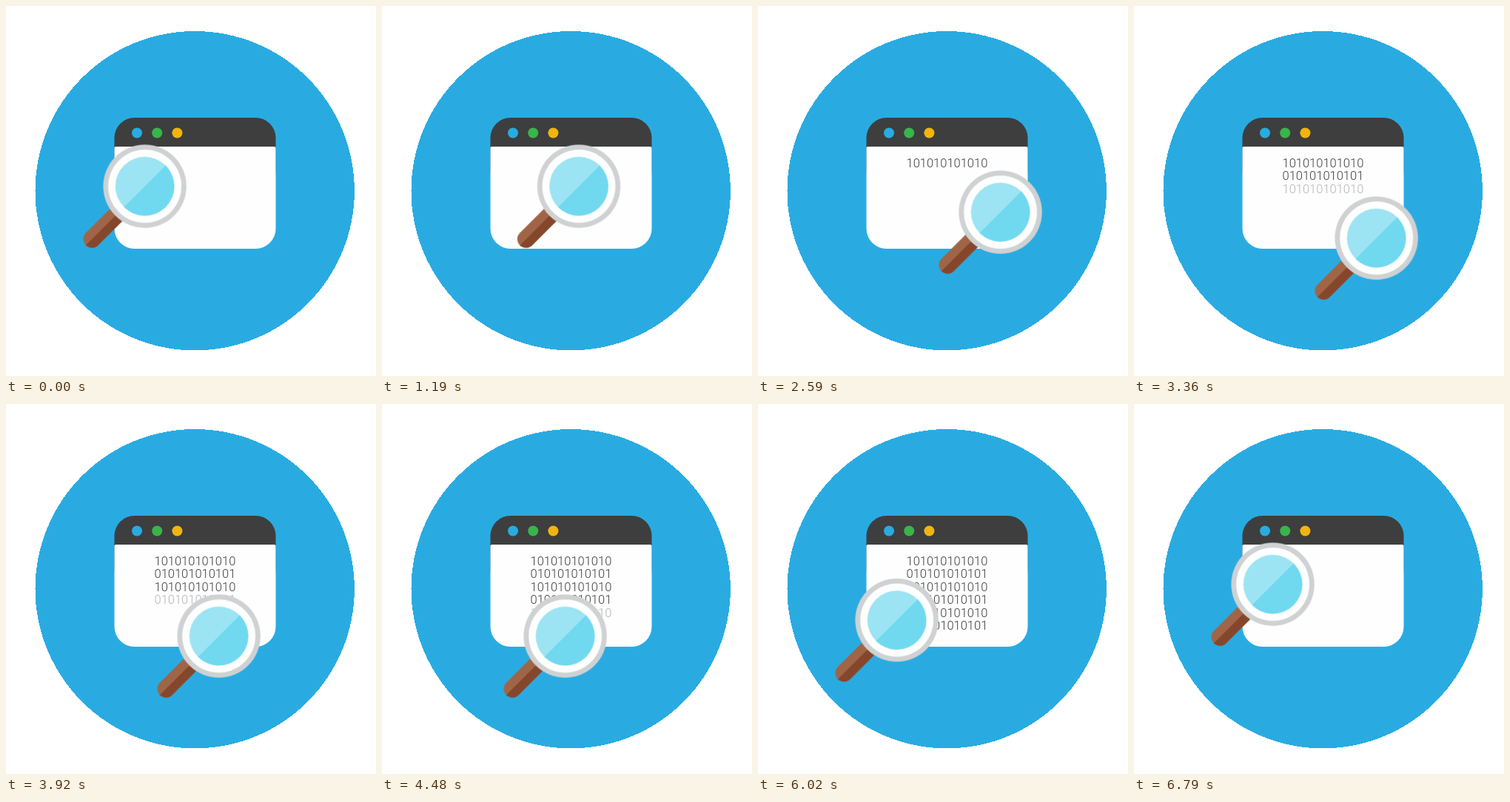
Recreate the animation shown at these times as an HTML page. Size 500 by 500 pixels, loop 6860 ms.

```html
<!DOCTYPE html>
<html lang="en">
<head>
<meta charset="utf-8">
<title>Code search</title>
<style>
  html, body { margin: 0; height: 100%; overflow: hidden; background: #fff; }
  svg { display: block; width: 100vw; height: 100vh; }

  /* 98 ticks of 70 ms; the tiny lead keeps each tick clear of rounding */
  .lens, .code { animation: 6860ms infinite -3ms; }
  .lens { animation-name: scan; }
  .code { animation-name: clear; }
  .code text {
    font: 300 16.5px Roboto, "Open Sans", sans-serif;
    fill: #3e3e3e;
    animation: reveal 6860ms calc(2027ms + var(--row) * 560ms) infinite backwards;
  }

  @keyframes scan {
    0%       { transform: translate(187.6px, 243.6px); }
    3.0612%  { transform: translate(187.6px, 243.6px); animation-timing-function: steps(25); }
    28.5714% { transform: translate(327.6px, 243.6px); }
    30.6122% { transform: translate(327.6px, 243.6px); animation-timing-function: steps(14); }
    44.8980% { transform: translate(327.6px, 313.6px); }
    48.9796% { transform: translate(327.6px, 313.6px); animation-timing-function: steps(28); }
    77.5510% { transform: translate(187.6px, 313.6px); }
    83.6735% { transform: translate(187.6px, 313.6px); animation-timing-function: steps(13); }
    96.9388%, 100% { transform: translate(187.6px, 243.6px); }
  }
  @keyframes reveal {
    0% { opacity: 0; animation-timing-function: steps(8); }
    8.1633%, 100% { opacity: 1; }
  }
  @keyframes clear {
    0% { opacity: 0; animation-timing-function: step-end; }
    29.5918% { opacity: 1; animation-timing-function: step-end; }
    93.8776% { opacity: 1; animation-timing-function: steps(3); }
    96.9388%, 100% { opacity: 0; }
  }
</style>
</head>
<body>
<svg viewBox="0 0 500 500">
  <circle cx="255.2" cy="249.7" r="215.7" fill="#29abe2" shape-rendering="crispEdges"/>

  <rect x="146.5" y="151" width="218" height="100" rx="27" fill="#3e3e3e"/>
  <path d="M148.5 190H362.5a2 2 0 0 1 2 2V301a27 27 0 0 1-27 27H173.5a27 27 0 0 1-27-27V192a2 2 0 0 1 2-2Z" fill="#fefefe"/>
  <circle cx="177" cy="171.5" r="7" fill="#29abe2"/>
  <circle cx="204.2" cy="171.5" r="7" fill="#39b54a"/>
  <circle cx="231.4" cy="171.5" r="7" fill="#f2b50c"/>

  <g class="code">
    <text style="--row:0" x="200.5" y="218">101010101010</text>
    <text style="--row:1" x="200.5" y="235.4">010101010101</text>
    <text style="--row:2" x="200.5" y="252.8">101010101010</text>
    <text style="--row:3" x="200.5" y="270.2">010101010101</text>
    <text style="--row:4" x="200.5" y="287.6">101010101010</text>
    <text style="--row:5" x="200.5" y="305">010101010101</text>
  </g>

  <g class="lens">
    <g transform="rotate(45)">
      <path d="M-11.8 45H11.8V101a11.8 11.8 0 0 1-23.6 0Z" fill="#a06546"/>
      <path d="M0 45H11.8V101a11.8 11.8 0 0 1-11.8 11.8Z" fill="#85472c"/>
      <circle r="56.2" fill="#cfd1d2"/>
      <circle r="49.4" fill="#fefefe"/>
      <circle r="39.8" fill="#9ce4f3"/>
      <path d="M0-39.8a39.8 39.8 0 0 1 0 79.6Z" fill="#70d9ef"/>
    </g>
  </g>
</svg>
</body>
</html>
```
